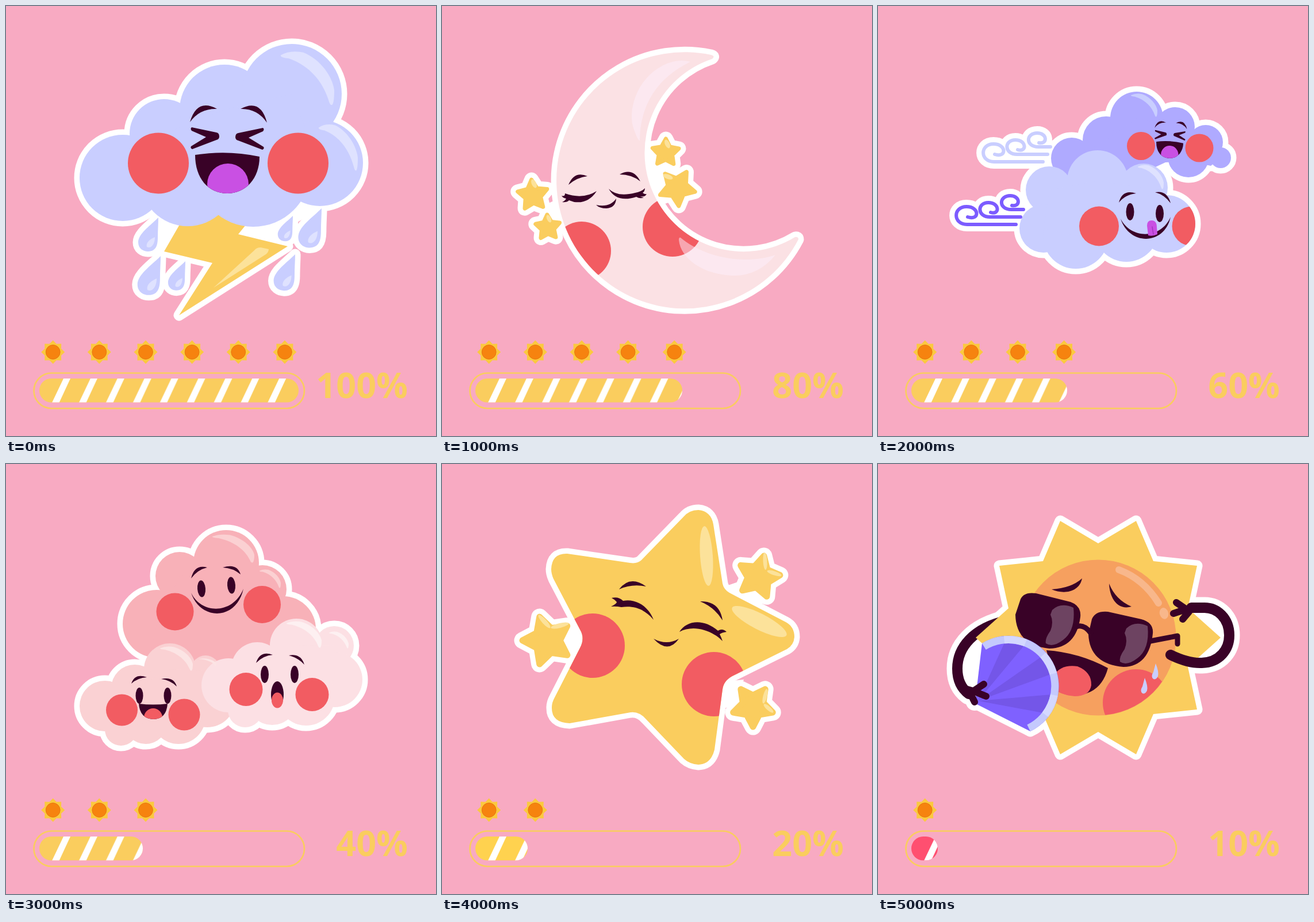
Animation, 748 px wide and 748 px high, one loop 6 s. Source, as an HTML page:

```html
<!DOCTYPE html>
<html lang="en">
<head>
<meta charset="utf-8">
<title>Weather battery</title>
<style>
html, body { margin: 0; width: 100%; height: 100%; overflow: hidden; background: #f8aac2; }
svg { display: block; width: 100vw; height: 100vh; }
polygon, path { vector-effect: non-scaling-stroke; }
text { font: 600 61px "Noto Sans", "Open Sans", sans-serif; fill: #facd5e; text-anchor: end; }
.outline { fill: #fff; stroke: #fff; stroke-width: 19; stroke-linejoin: round; stroke-linecap: round; }
.line { fill: none; stroke-linecap: round; stroke-linejoin: round; }
.dark { fill: #390227; }
.cheek { fill: #f25c62; }
.yellow { fill: #facd5e; }
.tiny { fill: #facd5e; stroke: #facd5e; stroke-linejoin: round; }
.shine { fill: #fce29a; }
.scene { visibility: hidden; animation: show 6s step-end infinite; animation-delay: calc((var(--i) - 6) * 1s); }
.level { animation: level 6s step-end infinite; }
.count { animation: count 6s step-end infinite; }
.charge { animation: charge 6s step-end infinite; }
@keyframes show { 0% { visibility: visible; } 16.666% { visibility: hidden; } }
@keyframes level {
  0% { width: 451px; } 16.666% { width: 360px; } 33.333% { width: 271px; }
  50% { width: 180px; } 66.666% { width: 91px; } 83.333% { width: 46px; }
}
@keyframes count {
  0% { width: 484px; } 16.666% { width: 403px; } 33.333% { width: 322px; }
  50% { width: 242px; } 66.666% { width: 161px; } 83.333% { width: 80px; }
}
@keyframes charge { 0% { fill: #facd5e; } 66.666% { fill: #ffd24f; } 83.333% { fill: #ff4f70; } }
</style>
</head>
<body>
<svg viewBox="0 0 748 748">
<defs>
  <path id="shine" d="M0 8Q18-2 42 3C75 16 97 48 100 72Q100 95 96 99Q92 100 90 92C80 60 57 28 15 14Q-2 12 0 8Z"/>
  <polygon id="star" points="0,-100 31,-42 95,-31 49,16 59,81 0,52 -59,81 -49,16 -95,-31 -31,-42"/>
  <path id="drop" d="M0 0C-14 14-35 28-35 43C-35 54-26 59-18 59C-4 59-1 48-1 35C-1 22 0 10 0 0Z"/>
  <path id="gleam" d="M-6 34C-16 38-22 45-20 51C-14 55-6 48-6 34Z"/>
  <g id="sun">
    <polygon fill="#fbc93f" points="20.5,0 14.3,6 14.5,14.5 6,14.3 0,20.5 -6,14.3 -14.5,14.5 -14.3,6 -20.5,0 -14.3,-6 -14.5,-14.5 -6,-14.3 0,-20.5 6,-14.3 14.5,-14.5 14.3,-6"/>
    <circle r="12.4" fill="#f6830f" stroke="#e8780e"/>
  </g>
  <pattern id="stripes" x="58" y="648" width="46.9" height="42" patternUnits="userSpaceOnUse">
    <path fill="#fff" d="M42 0H54L34.5 42H22ZM-4.9 0H7.1L-12.4 42H-24.9Z"/>
  </pattern>
  <clipPath id="level"><rect class="level" x="58" y="648" width="451" height="41.5" rx="20.5"/></clipPath>
  <clipPath id="count"><rect class="count" x="42" y="578" width="484" height="48"/></clipPath>

  <path id="grin" d="M329 259Q385 250 441 262C441 300 417 326 385 326C352 326 329 300 329 259Z"/>
  <clipPath id="inGrin"><use href="#grin"/></clipPath>
  <path id="squint" d="M323 211L366 220Q371 221 371 227Q371 232 366 233L324 249Q320 247 322 244L348 228L323 217Q320 213 323 211Z"/>
  <g id="laugh" class="dark">
    <path d="M320 202Q332 160 367 179Q337 178 320 202ZM408 179Q443 160 454 203Q437 178 408 179Z"/>
    <use href="#squint"/><use href="#squint" transform="matrix(-1 0 0 1 770 1)"/>
    <use href="#grin"/>
    <circle cx="386" cy="310" r="36" fill="#c950e3" clip-path="url(#inGrin)"/>
  </g>

  <g id="storm">
    <circle cx="203" cy="299" r="75"/><circle cx="275" cy="222" r="60"/><circle cx="380" cy="180" r="78"/>
    <circle cx="497" cy="153" r="87"/><circle cx="546" cy="273" r="75"/><circle cx="316" cy="300" r="83"/>
    <circle cx="430" cy="284" r="100"/>
    <polygon points="203,299 275,222 380,180 497,153 546,273 430,300 316,300"/>
  </g>
  <polygon id="bolt" points="320,349 275,427 359,447 301,538 490,418 404,397 430,365"/>
  <g id="rain">
    <use href="#drop" transform="translate(265 368)"/><use href="#drop" transform="translate(269 435) scale(1.15)"/>
    <use href="#drop" transform="translate(312 444) scale(.86)"/><use href="#drop" transform="translate(499 365) scale(.75)"/>
    <use href="#drop" transform="translate(549 352) scale(1.16)"/><use href="#drop" transform="translate(503 432) scale(1.07)"/>
  </g>
  <g id="gleams">
    <use href="#gleam" transform="translate(265 368)"/><use href="#gleam" transform="translate(269 435) scale(1.15)"/>
    <use href="#gleam" transform="translate(312 444) scale(.86)"/><use href="#gleam" transform="translate(499 365) scale(.75)"/>
    <use href="#gleam" transform="translate(549 352) scale(1.16)"/><use href="#gleam" transform="translate(503 432) scale(1.07)"/>
  </g>

  <path id="moon" d="M468 85A223 223 0 1 0 620 406Q620 401 614 402A172 172 0 1 1 470 92Q476 87 468 85Z"/>
  <clipPath id="inMoon"><use href="#moon"/></clipPath>
  <g id="nightStars">
    <use href="#star" transform="translate(158 329) rotate(-5) scale(.27)"/>
    <use href="#star" transform="translate(184 385) rotate(-3) scale(.22)"/>
    <use href="#star" transform="translate(389 255) rotate(1) scale(.24)"/>
    <use href="#star" transform="translate(409 316) rotate(31) scale(.32)"/>
  </g>

  <g id="backCloud">
    <circle cx="337" cy="265" r="36"/><circle cx="397" cy="233" r="41"/><circle cx="450" cy="195" r="46"/>
    <circle cx="517" cy="210" r="34"/><circle cx="570" cy="237" r="30"/><circle cx="596" cy="264" r="18"/>
    <circle cx="540" cy="262" r="36"/>
    <polygon points="337,265 397,233 450,195 517,210 570,237 596,264 579,278 540,270 500,272 440,300 350,300"/>
  </g>
  <g id="frontCloud">
    <circle cx="382" cy="304" r="53"/><circle cx="298" cy="320" r="41"/><circle cx="288" cy="387" r="42"/>
    <circle cx="344" cy="400" r="57"/><circle cx="432" cy="389" r="56"/><circle cx="502" cy="379" r="50"/>
    <circle cx="462" cy="316" r="42"/>
    <polygon points="382,304 298,320 288,387 344,400 432,389 502,379 462,316"/>
  </g>
  <clipPath id="inPuff"><circle cx="502" cy="379" r="50"/></clipPath>
  <path id="wind" d="M240 380H155C130 380 130 349 154 349C177 349 177 374 156 367M248 367H195C172 367 172 342 192 342C212 342 212 364 196 359M253 354H232C209 354 210 330 230 330C248 330 248 350 233 347"/>

  <g id="topCloud">
    <circle cx="383" cy="172" r="57"/><circle cx="302" cy="195" r="42"/><circle cx="262" cy="278" r="59"/>
    <circle cx="446" cy="218" r="42"/><circle cx="482" cy="287" r="57"/>
    <polygon points="383,172 302,195 262,278 250,335 400,360 482,300 446,218"/>
  </g>
  <g id="leftCloud">
    <circle cx="285" cy="357" r="45"/><circle cx="172" cy="421" r="44"/><circle cx="224" cy="390" r="41"/>
    <circle cx="200" cy="462" r="28"/><circle cx="243" cy="450" r="37"/><circle cx="300" cy="440" r="47"/>
    <circle cx="350" cy="409" r="49"/><circle cx="347" cy="358" r="25"/>
    <polygon points="172,421 224,390 285,357 350,360 350,409 300,440 243,450 200,462"/>
  </g>
  <g id="rightCloud">
    <circle cx="505" cy="315" r="46"/><circle cx="571" cy="316" r="34"/><circle cx="572" cy="375" r="48"/>
    <circle cx="522" cy="405" r="50"/><circle cx="463" cy="410" r="44"/><circle cx="416" cy="428" r="30"/>
    <circle cx="387" cy="385" r="47"/><circle cx="437" cy="355" r="45"/>
    <polygon points="387,385 437,355 505,315 571,316 572,375 522,405 463,410 416,428"/>
  </g>
  <path id="smallGrin" d="M231 417Q256 420 281 417Q279 444 256 444Q233 443 231 417Z"/>
  <clipPath id="inSmallGrin"><use href="#smallGrin"/></clipPath>

  <path id="bigStar" d="M347 167L420 92Q430 80 446 80Q468 82 472 105L488 208Q490 218 500 224L598 275Q613 283 613 301Q612 315 600 322L505 369Q490 377 488 392L474 497Q468 522 446 523Q431 522 421 513L355 444Q343 430 328 432L222 451Q190 450 191 423Q191 415 196 406L240 320Q249 303 240 288L194 200Q190 191 190 183Q191 155 218 156L327 172Q340 174 347 167Z"/>
  <clipPath id="inStar"><use href="#bigStar"/></clipPath>
  <g id="friends">
    <use href="#star" transform="translate(551 196) rotate(14) scale(.37)"/>
    <use href="#star" transform="translate(183 307) rotate(-18) scale(.43)"/>
    <use href="#star" transform="translate(541 421) rotate(36) scale(.36)"/>
  </g>

  <polygon id="rays" points="596,302 539,353 555,427 479,435 449,505 383,466 317,505 287,435 211,427 227,353 170,302 227,251 211,177 287,169 317,99 383,138 449,99 479,169 555,177 539,251"/>
  <clipPath id="inDisc"><circle cx="383" cy="302" r="135"/></clipPath>
  <path id="fan" d="M170 405L181 312A87.4 87.4 0 1 1 265 465L172 418Z"/>
  <path id="rim" fill="none" stroke-width="13" d="M184.300 317.500A81 81 0 1 1 262.200 459.300"/>
  <path id="leftArm" d="M225 272C165 285 138 320 138 356Q138 385 158 400"/>
  <path id="rightArm" d="M509 332Q540 347 563 346C595 345 611 322 611 298C611 268 590 250 568 250H545"/>
  <g id="hands">
    <path d="M152 391L166 395L184 383M166 395L188 404M160 398L168 414"/>
    <path d="M552 253L535 252L519 241M535 253L514 260M541 257L530 270"/>
  </g>
  <path id="glint" d="M303 254Q318 240 340 250Q344 290 322 306Q304 320 292 312Q290 304 300 290Q306 275 300 262Z"/>
  <path id="sweat" d="M483 347Q489 362 487 369Q484 376 479 374Q474 370 479 362Z"/>
</defs>

<rect width="748" height="748" fill="#f8aac2"/>

<g class="scene" style="--i:0">
  <g class="outline">
    <use href="#storm"/><use href="#rain"/><use href="#bolt"/>
    <path stroke="none" d="M262 360L301 382L275 427L266 437ZM404 397L416 375L508 340L545 355L500 380L490 418Z"/>
  </g>
  <use href="#bolt" class="yellow"/>
  <path class="shine" d="M361 490L432 425Q436 420 443 420L457 423Q457 428 452 432Z"/>
  <g fill="#c9ceff"><use href="#rain"/><use href="#storm"/></g>
  <g fill="#dfe2ff">
    <use href="#gleams"/>
    <use href="#shine" transform="translate(478 78) scale(.93 .95)"/>
    <use href="#shine" transform="translate(544 205) scale(.68 .82)"/>
  </g>
  <g class="cheek"><circle cx="265" cy="273.5" r="53"/><circle cx="508" cy="273.5" r="53"/></g>
  <use href="#laugh"/>
  <text x="699" y="682">100%</text>
</g>

<g class="scene" style="--i:1">
  <g class="outline">
    <use href="#moon"/>
    <use href="#nightStars" style="stroke-width:25px"/>
    <path stroke="none" d="M362 238L385 250L400 340L385 345L362 290ZM170 350L203 335L207 385L180 390Z"/>
  </g>
  <use href="#moon" fill="#fbe1e4"/>
  <g class="cheek" clip-path="url(#inMoon)"><circle cx="243" cy="426" r="51"/><circle cx="401" cy="384" r="52"/></g>
  <g fill="#fdeffe" opacity=".5">
    <path d="M432 97Q410 91 385 103C337 127 322 185 334 215Q341 235 344 234C345 170 375 125 432 97Z"/>
    <path d="M415 403C460 440 530 450 580 433Q550 470 505 469C455 467 415 440 412 407Q412 402 415 403Z"/>
  </g>
  <use href="#nightStars" class="tiny" stroke-width="7"/>
  <g class="shine">
    <ellipse cx="160" cy="309" rx="4" ry="8" transform="rotate(-25 160 309)"/>
    <ellipse cx="186" cy="370" rx="3.5" ry="7" transform="rotate(-25 186 370)"/>
    <ellipse cx="392" cy="240" rx="4" ry="8" transform="rotate(-25 392 240)"/>
    <ellipse cx="393" cy="297" rx="9" ry="4" transform="rotate(20 393 297)"/>
  </g>
  <path class="dark" d="M220 311Q230 286 253 296Q235 298 220 311ZM309 293Q332 280 345 305Q330 293 309 293Z
    M214 326Q245 337 269 322Q255 344 230 341L221 338Q217 342 209 341Q214 339 216 335Q210 334 208 330Q214 332 214 326Z
    M290 318Q305 333 336 325Q347 323 353 317Q353 322 349 325Q353 328 356 327Q353 333 344 331Q348 333 351 333Q345 336 338 332Q304 343 290 318Z
    M268 346Q292 351 303 335Q302 351 286 352Q274 352 268 346Z"/>
  <text x="699" y="682">80%</text>
</g>

<g class="scene" style="--i:2">
  <g class="outline"><use href="#backCloud"/><use href="#frontCloud"/></g>
  <g class="outline" style="stroke-width:24px">
    <use href="#wind"/><use href="#wind" transform="translate(47 -109)"/>
  </g>
  <use href="#backCloud" fill="#afaaff"/>
  <use href="#frontCloud" fill="#c9ceff"/>
  <g class="line" stroke-width="6">
    <use href="#wind" stroke="#7c5cff"/><use href="#wind" stroke="#c9ceff" transform="translate(47 -109)"/>
  </g>
  <use href="#shine" fill="#c9ceff" transform="translate(440 152) scale(.46 .41)"/>
  <use href="#shine" fill="#dfe2ff" transform="translate(452 276) scale(.45 .43)"/>
  <g class="cheek">
    <circle cx="457.5" cy="243.5" r="24.5"/><circle cx="559" cy="247" r="24.5"/>
    <circle cx="384.5" cy="383" r="34.5"/><circle cx="546" cy="383" r="34.5" clip-path="url(#inPuff)"/>
  </g>
  <use href="#laugh" transform="rotate(2 508 235) translate(346 128) scale(.42)"/>
  <g class="dark">
    <path d="M419 342Q425 318 449 326Q430 328 419 342ZM482 324Q503 320 509 343Q498 328 482 324ZM422 370C440 406 492 406 509 367C498 417 437 417 422 370Z"/>
    <ellipse cx="438.5" cy="358" rx="7" ry="15"/><ellipse cx="490" cy="361" rx="7" ry="15"/>
  </g>
  <path fill="#c950e3" d="M468 382Q468 373 476 373Q485 373 485 385L486 397Q478 401 470 399Z"/>
  <path class="line" stroke="#a535be" stroke-width="1.5" d="M477 384L479 397"/>
  <text x="699" y="682">60%</text>
</g>

<g class="scene" style="--i:3">
  <g class="outline"><use href="#topCloud"/><use href="#leftCloud"/><use href="#rightCloud"/></g>
  <use href="#topCloud" fill="#f8b1b8"/>
  <use href="#leftCloud" fill="#fad1d3"/>
  <use href="#rightCloud" fill="#fce0e4"/>
  <g fill="#fbd0d2">
    <use href="#shine" transform="translate(359 122) scale(.73 .5)"/>
    <use href="#shine" transform="translate(441 183) scale(.37 .33)"/>
  </g>
  <g fill="#fce4e4">
    <use href="#shine" transform="translate(268 317) scale(.57 .43)"/>
    <use href="#shine" transform="translate(336 338) scale(.3 .13)"/>
  </g>
  <g fill="#fdf0f1">
    <use href="#shine" transform="translate(488 273) scale(.61 .47)"/>
    <use href="#shine" transform="translate(562 291) scale(.34 .3)"/>
  </g>
  <g class="cheek">
    <circle cx="294" cy="257" r="32.5"/><circle cx="445.5" cy="244.5" r="32.5"/>
    <circle cx="201.5" cy="428" r="27.5"/><circle cx="310" cy="436" r="27.5"/>
    <circle cx="417.5" cy="392" r="29"/><circle cx="532.5" cy="401" r="29"/>
  </g>
  <g class="dark">
    <path d="M322 199Q328 174 350 180Q333 184 322 199ZM377 180Q402 172 408 192Q395 181 377 180ZM322 224C340 262 395 262 413 217C401 273 338 273 322 224Z
      M218 382Q224 363 245 371Q229 372 218 382ZM270 374Q292 369 297 387Q286 376 270 374Z
      M435 346Q442 324 464 332Q448 333 435 346ZM492 333Q513 329 519 349Q508 337 492 333Z"/>
    <ellipse cx="340" cy="217" rx="7" ry="14.5" transform="rotate(-4 340 217)"/>
    <ellipse cx="392" cy="211" rx="7" ry="14.5" transform="rotate(-4 392 211)"/>
    <ellipse cx="232" cy="403" rx="6.5" ry="14"/><ellipse cx="281" cy="403" rx="6.5" ry="14"/>
    <ellipse cx="450" cy="366" rx="7" ry="15"/><ellipse cx="502" cy="366" rx="7" ry="15"/>
    <use href="#smallGrin"/><ellipse cx="472" cy="401" rx="11" ry="23"/>
  </g>
  <g class="cheek">
    <circle cx="256" cy="441" r="16" clip-path="url(#inSmallGrin)"/><ellipse cx="472" cy="411" rx="10" ry="13.5"/>
  </g>
  <text x="699" y="682">40%</text>
</g>

<g class="scene" style="--i:4">
  <g class="outline">
    <use href="#bigStar"/><use href="#friends" style="stroke-width:29px"/>
    <path stroke="none" d="M495 212L515 205L565 240L545 248ZM497 378L525 375L510 420L490 425ZM215 272L245 303L218 345Z"/>
  </g>
  <use href="#bigStar" class="yellow"/>
  <use href="#friends" class="tiny" stroke-width="11"/>
  <g class="cheek" clip-path="url(#inStar)"><circle cx="262" cy="316" r="56"/><circle cx="473" cy="383" r="56"/></g>
  <g class="shine">
    <ellipse cx="460" cy="160" rx="11" ry="52" transform="rotate(-4 460 160)"/>
    <ellipse cx="552" cy="274" rx="53" ry="14" transform="rotate(27 552 274)"/>
    <ellipse cx="562" cy="169" rx="3.5" ry="15" transform="rotate(-3 562 169)"/>
    <ellipse cx="578" cy="190" rx="13" ry="3.5" transform="rotate(18 578 190)"/>
    <ellipse cx="178" cy="274" rx="15" ry="4" transform="rotate(48 178 274)"/>
    <ellipse cx="205" cy="281" rx="16" ry="4" transform="rotate(-14 205 281)"/>
    <ellipse cx="562" cy="404" rx="3.5" ry="13" transform="rotate(14 562 404)"/>
    <ellipse cx="568" cy="425" rx="11" ry="3.5" transform="rotate(42 568 425)"/>
  </g>
  <path class="dark" d="M308 218Q327 193 355 213Q330 208 308 218ZM449 239Q483 238 488 272Q474 249 449 239Z
    M294 248Q304 243 304 240Q301 236 295 233Q307 230 315 238C335 234 358 245 368 271C352 252 334 246 312 249Q302 247 294 248Z
    M413 292C425 272 455 268 480 290Q488 285 495 292Q487 293 483 296Q486 302 488 308Q480 300 474 297C452 284 430 283 413 292Z
    M368 304Q391 316 412 304Q393 331 368 304Z"/>
  <text x="699" y="682">20%</text>
</g>

<g class="scene" style="--i:5">
  <g class="outline">
    <use href="#rays"/><use href="#fan"/>
    <use href="#hands" style="stroke-width:30px"/>
    <g style="stroke-width:37px"><use href="#leftArm"/><use href="#rightArm"/></g>
    <path d="M205 275L150 340L165 400L190 315Z"/>
  </g>
  <use href="#leftArm" class="line" stroke="#390227" stroke-width="18"/>
  <use href="#rays" class="yellow"/>
  <circle cx="383" cy="302" r="135.5" fill="#f6a05f"/>
  <path class="line" stroke="#f8b78b" stroke-width="12" d="M419 184Q462 200 488 242"/>
  <ellipse cx="497.5" cy="260" rx="7.5" ry="10" fill="#f8b78b" transform="rotate(-15 497 260)"/>
  <circle class="cheek" cx="449" cy="415" r="58" clip-path="url(#inDisc)"/>
  <g fill="#c9ceff"><use href="#sweat"/><use href="#sweat" x="-19" y="25"/></g>
  <path class="dark" d="M302 218Q336 216 355 199C350 224 322 227 302 218ZM402 208Q413 236 441 248C418 255 403 235 402 208ZM293 324Q350 328 400 355Q392 385 370 396Q340 410 312 395Z"/>
  <path class="cheek" d="M306 368Q318 348 347 352Q372 362 371 385Q368 404 342 404Q318 402 305 390Z"/>
  <path class="dark" d="M239 262L248 235Q254 222 275 225L335 240Q354 247 352 266Q345 320 298 321Q240 315 239 262ZM366 296L372 270Q378 255 400 257L458 270Q480 276 478 295Q472 352 427 353Q368 348 366 296Z"/>
  <g class="line" stroke="#390227" stroke-width="9">
    <path d="M345 283Q358 278 370 294M474 308L521 299V313"/>
    <use href="#rightArm" stroke-width="18"/>
  </g>
  <g fill="#6d4361"><use href="#glint"/><use href="#glint" x="129" y="32"/></g>
  <use href="#fan" fill="#7f61ff"/>
  <path fill="#7456e8" d="M174 412L220 311L254 316ZM174 412L283 336L300 366ZM174 412L301 401L287 433Z"/>
  <use href="#rim" stroke="#c4c9fd"/>
  <use href="#rim" stroke="#d4d8ff" stroke-dasharray="0 37.5 37.5 0"/>
  <use href="#hands" class="line" stroke="#390227" stroke-width="12"/>
  <text x="699" y="682">10%</text>
</g>

<g clip-path="url(#count)">
  <use href="#sun" x="81.7" y="602"/><use href="#sun" x="162.3" y="602"/><use href="#sun" x="243" y="602"/>
  <use href="#sun" x="323.6" y="602"/><use href="#sun" x="404.2" y="602"/><use href="#sun" x="484.9" y="602"/>
</g>
<rect x="48.5" y="638.5" width="470.5" height="61.5" rx="30.7" fill="none" stroke="#facd5e" stroke-width="2.6"/>
<g clip-path="url(#level)">
  <rect class="charge" x="58" y="648" width="451" height="42" fill="#facd5e"/>
  <rect x="58" y="648" width="438" height="42" fill="url(#stripes)"/>
</g>
</svg>
</body>
</html>
```
